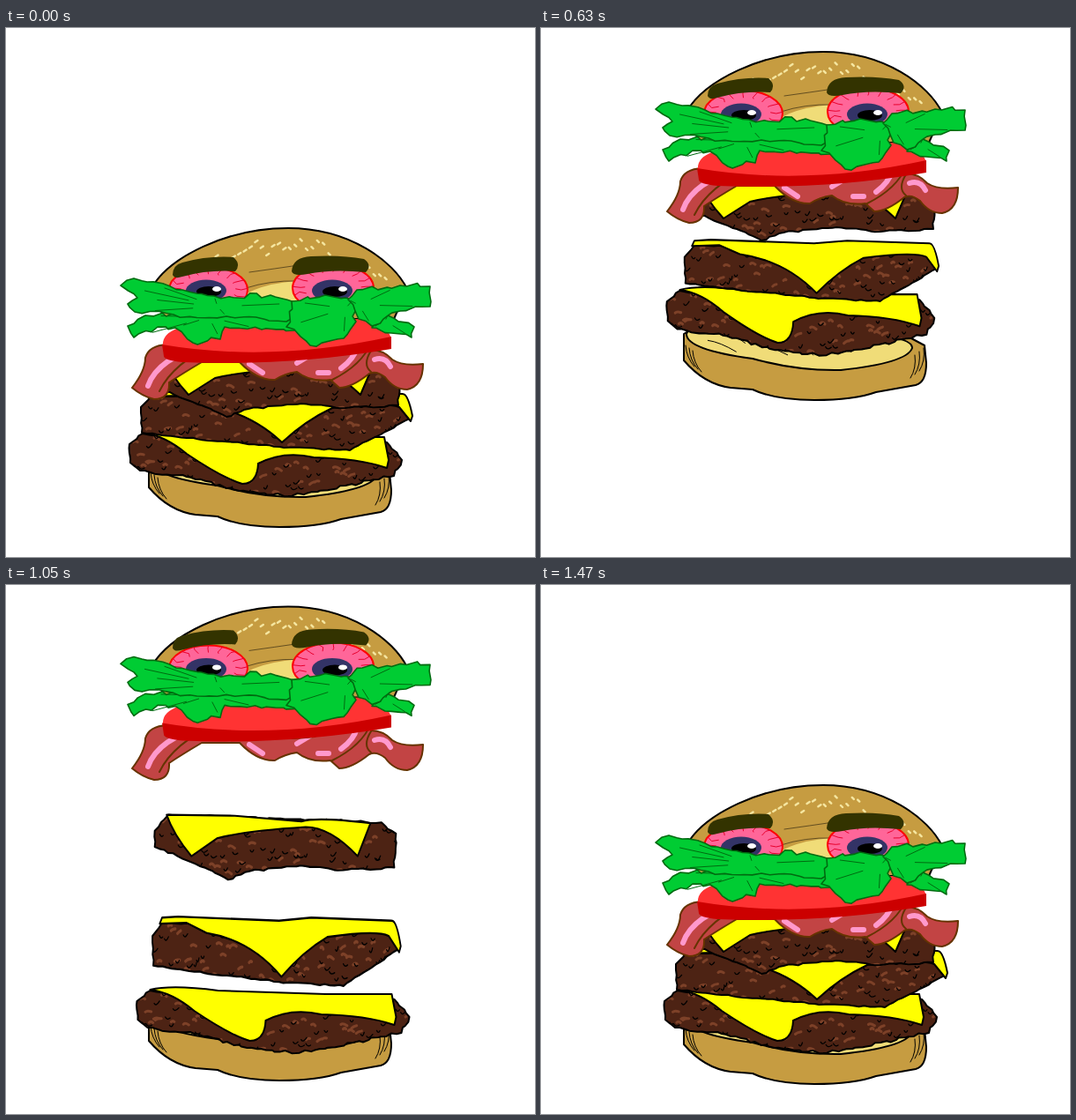
Write an HTML page that moves like this. It is 600 px wide and 600 px high and loops after 1500 ms.

```html
<!DOCTYPE html>
<html lang="en">
<head>
<meta charset="utf-8">
<title>Bouncing burger</title>
<style>
html, body { margin: 0; height: 100%; overflow: hidden; background: #fff }
svg { display: block; width: 600px; height: 600px; stroke-linejoin: round; stroke-linecap: round; fill: none }
.ink { stroke: #000; stroke-width: 2 }
.thin { stroke: #000; stroke-width: 1 }
.crust { fill: #c69c41 }
.crumb { fill: #f0dc78 }
.cheese { fill: #ff0 }
.meat { fill: #4d2314 }
.sear { stroke: #7d4128; stroke-width: 3 }
.char { stroke: #000; stroke-width: 1.3 }
.leaf { fill: #0c3; stroke: #006b10; stroke-width: 1.6 }
.vein { stroke: #006b10 }
.bacon { fill: #c24444; stroke: #630; stroke-width: 2 }
.rind { stroke: #630; stroke-width: 2 }
.fat { stroke: #f9c; stroke-width: 6 }
.eye { fill: #f69; stroke: #f00; stroke-width: 2 }
.blood { stroke: #e8002c }
.seed { stroke: #f5e6a0; stroke-width: 2.4 }
</style>
</head>
<body>
<svg viewBox="0 0 600 600">
<g id="burger">
  <g id="heel">
    <path class="crust ink" d="M162 487V517Q185 544 215 548L240 550Q265 562 310 562T380 553L425 545Q437 542 437 520L435 500 420 492 170 482Z"/>
    <path class="crumb ink" d="M165 487Q168 474 250 473T380 487Q422 493 421 503 415 520 340 528 290 529 240 515 165 505 165 487Z"/>
    <path class="thin" id="grain"/>
  </g>
  <g id="patty3"></g>
  <g id="patty2"></g>
  <g id="patty1"></g>
  <g id="bacon">
    <path class="bacon" d="M143 264Q158 245 158 230 162 216 183 215 203 202 220 210L262 213Q320 212 355 219H365Q373 203 395 209L414 213V221Q428 221 438 232 450 240 473 237 473 262 455 266 440 266 430 252 420 244 412 248 392 264 378 264L368 255Q345 258 330 246 316 248 305 255 285 256 265 235L222 235Q200 248 185 258 186 277 168 277 155 274 143 264Z"/>
    <path class="fat" d="M161 262Q172 230 229 215M284 222l14 3M276 237l15 10M330 236l20-12M380 242Q395 231 398 218M418 232Q430 228 436 240M354 247h12"/>
    <path class="rind" d="M174 268Q190 235 240 213 290 236 350 228L365 219M262 217Q310 210 340 228M414 213Q404 238 370 255M414 222Q404 238 414 246"/>
  </g>
  <g id="top">
    <path class="crust ink" d="M165 95C185 60 250 27 320 27S440 65 455 96L440 130H180Z"/>
    <path class="crumb" d="M258 112Q282 88 345 86V118Z"/>
    <path class="thin" stroke-opacity=".5" d="M272 95Q300 86 330 87M276 77Q305 73 332 69"/>
    <path class="seed" id="seeds"/>
    <g id="eyes"></g>
    <g id="brows" fill="#330">
      <path d="M189 80Q189 69 200 66 230 58 258 60 267 68 260 76 230 74 200 82 191 85 189 80Z"/>
      <path d="M324 76Q325 60 346 59 380 57 406 62 416 69 408 77 370 73 342 79 326 82 324 76Z"/>
    </g>
    <path fill="#f33" d="M178 160Q176 134 250 134L400 130Q436 138 437 154 300 180 178 160Z"/>
    <path fill="#c00" d="M177 159Q300 180 437 150V164Q320 184 200 179 179 177 179 172Z"/>
    <g id="lettuce"></g>
  </g>
</g>
</svg>
<script>
const $ = id => document.getElementById(id);
let seed = 7;
const rnd = (lo, hi) => lo + (hi - lo) * (seed = seed * 16807 % 2147483647) / 2147483647;
const repeat = (n, make) => Array.from({ length: n }, (_, i) => make(i)).join('');
const pairs = text => text.split(' ').map(p => p.split(',').map(Number));
const mix = (a, b, f) => a.map((v, i) => v + (b[i] - v) * f);

// Closed outline through key points, broken up into short jittered edges.
function rough(pts, step, amp) {
  const out = pts.flatMap((a, i) => {
    const b = pts[(i + 1) % pts.length];
    const n = Math.ceil(Math.hypot(b[0] - a[0], b[1] - a[1]) / step);
    return Array.from({ length: n }, (_, j) => j ? mix(a, b, j / n).map(v => v + rnd(-amp, amp)) : a);
  });
  return `M${out.join('L')}Z`;
}

function patty(id, amp, keyPoints, cheese) {
  const pts = pairs(keyPoints), d = rough(pts, 6, amp);
  const [xs, ys] = [0, 1].map(axis => pts.map(p => p[axis]));
  const marks = (n, bend) => repeat(n, i => {
    const x = Math.min(...xs) + (Math.max(...xs) - Math.min(...xs)) * (i + rnd(0, 1)) / n;
    return `M${x} ${rnd(Math.min(...ys), Math.max(...ys))}q2 ${bend} ${rnd(3, 7)} ${rnd(-3, 2)}`;
  });
  $(id).innerHTML = `<clipPath id="${id}-clip"><path d="${d}"/></clipPath>
    <path class="meat" d="${d}"/>
    <g clip-path="url(#${id}-clip)"><path class="sear" d="${marks(60, -2)}"/><path class="char" d="${marks(70, 4)}"/></g>
    <path class="ink" d="${d}"/><path class="cheese ink" d="${cheese}"/>`;
}

patty('patty1', 1.2, '180,190 164,207 164,224 222,246 250,259 275,250 335,244 385,249 445,246 447,210 430,198',
  'M178 190L258 191Q310 195 336 197 355 192 417 199L402 234Q370 203 341 203 270 207 237 215L207 234Q186 211 178 190Z');
patty('patty2', .8, '165,417 153,430 154,459 205,465 310,475 390,479 430,458 458,443 450,428 415,426',
  'M162 418L165 412 185 411 310 415 350 412 450 415Q456 415 461 440L459 446 446 430Q432 424 370 431 340 445 313 470 275 434 220 427L195 417Z');
patty('patty3', 1.8, '155,460 140,472 141,493 152,502 205,509 265,525 320,531 385,519 440,508 449,490 432,470',
  'M155 459Q180 453 232 460L354 464H429L434 490 432 499Q400 488 349 487 315 479 286 494 285 517 268 517 245 510 205 483 180 462 155 459Z');

function leaf(keyPoints, root) {
  const pts = pairs(keyPoints);
  const veins = repeat(Math.ceil(pts.length / 2), i => `M${mix(root, pts[i * 2], .3)}L${mix(root, pts[i * 2], .75)}`);
  $('lettuce').innerHTML += `<path class="leaf" d="${rough(pts, 9, 3)}"/><path class="vein" d="${veins}"/>`;
}
leaf('433,126 463,139 460,151 437,146 415,140', [430, 132]);
leaf('158,126 138,138 145,151 172,139 192,140 212,157 243,153 248,139 290,142 328,143 330,118', [230, 128]);
leaf('130,92 145,84 160,88 200,97 236,104 300,103 333,112 318,133 250,127 190,125 146,122 138,113 149,106', [240, 116]);
leaf('324,110 362,103 394,108 397,133 383,152 345,160 318,139', [385, 118]);
leaf('388,108 398,97 447,92 481,93 481,116 447,121 415,138 400,130', [400, 114]);

$('seeds').setAttribute('d', repeat(36, i => {
  const x = 212 + i * 6.4;
  return `M${x} ${32 + ((x - 318) / 18) ** 2 + rnd(5, 26)}l${x < 320 ? '3-2' : '2 2'}`;
}));

$('grain').setAttribute('d',
  repeat(12, i => `M${190 + i * 16 + rnd(-6, 6)} ${rnd(482, 502)}q14 2 ${rnd(18, 40)} ${rnd(9, 13)}`) +
  repeat(3, i => `M${164 + i * 4} ${500 + i * 3}q1 14 10 24M${434 - i * 5} ${503 + i * 4}q2 15-5 26`));

function eye(cx, cy, rx, ry, px) {
  const veins = repeat(11, i => {
    const a = Math.PI * (.9 + i * .12), rim = [cx + rx * Math.cos(a), cy + ry * Math.sin(a)];
    return `M${rim}L${mix(rim, [cx, cy], .18).map(v => v + rnd(-3, 3))}L${mix(rim, [cx, cy], .3)}`;
  });
  $('eyes').innerHTML += `<ellipse class="eye" cx="${cx}" cy="${cy}" rx="${rx}" ry="${ry}"/><path class="blood" d="${veins}"/>
    <ellipse fill="#336" cx="${px}" cy="98" rx="23" ry="12.500"/><ellipse cx="${px + 3}" cy="99" rx="14" ry="6" fill="#000"/>
    <ellipse fill="#fff" cx="${px + 12}" cy="96" rx="5" ry="3"/>`;
}
eye(229.5, 97, 44.5, 26, 227);
eye(371, 95, 46, 27, 370);

const LIFT = 200;
const ramp = (t, from, to) => Math.min(1, Math.max(0, (t - from) / (to - from)));
const bump = (t, from, to) => Math.sin(Math.PI * ramp(t, from, to));
const place = (id, [px, py], x, y, sx = 1, sy = 1) =>
  $(id).setAttribute('transform', `translate(${px + x} ${py + y}) scale(${sx} ${sy}) translate(${-px} ${-py})`);

// Each piece drops from the lifted stack between two times; soft ones stretch, then squash on landing.
const pieces = [
  { id: 'heel', pivot: [299, 562], rest: 4, fall: [540, 855], drop: 196, press: 4 },
  { id: 'patty3', pivot: [294, 517], rest: 0, fall: [540, 990], soft: 1, sway: 10 },
  { id: 'patty2', pivot: [306, 470], rest: 0, fall: [540, 1125], soft: 1, slim: .06 },
  { id: 'patty1', pivot: [306, 234], rest: 182, fall: [860, 1275], soft: .8 },
  { id: 'bacon', pivot: [306, 240], rest: 144, fall: [1080, 1400] },
  { id: 'top', pivot: [306, 180], rest: 200, fall: [1200, 1440], hop: 3 }
];

function draw() {
  const t = Math.floor(performance.now() % 1500 / 30) * 30;
  const squash = ramp(t, 0, 270) - ramp(t, 270, 330);
  const leap = Math.sin(Math.PI / 2 * ramp(t, 270, 420));
  place('burger', [306, 566], 0, 15 * ramp(t, 420, 540) - (LIFT + 15) * leap, 1 + .136 * squash, 1 - .12 * squash);

  for (const { id, pivot, rest, fall: [from, to], drop = LIFT, soft = 0, slim = 0, sway = 0, press = 0, hop = 0 } of pieces) {
    const p = ramp(t, from, to), stretch = p < 1 ? soft * p : -soft * bump(t, to, to + 60);
    const settled = Math.max(p, 1 - ramp(t, 0, 220));
    const x = sway * bump(t, 850, 1470);
    const y = rest + drop * p + press * ramp(t, 1200, 1440) - hop * bump(t, 990, 1170);
    place(id, pivot, x, y, (1 - .09 * stretch) * (1 - slim * (1 - settled)), 1 + .18 * stretch);
  }
  place('brows', [300, 70], 0, 6 * (ramp(t, 1080, 1260) - ramp(t, 540, 720)));
  requestAnimationFrame(draw);
}
draw();
</script>
</body>
</html>
```
